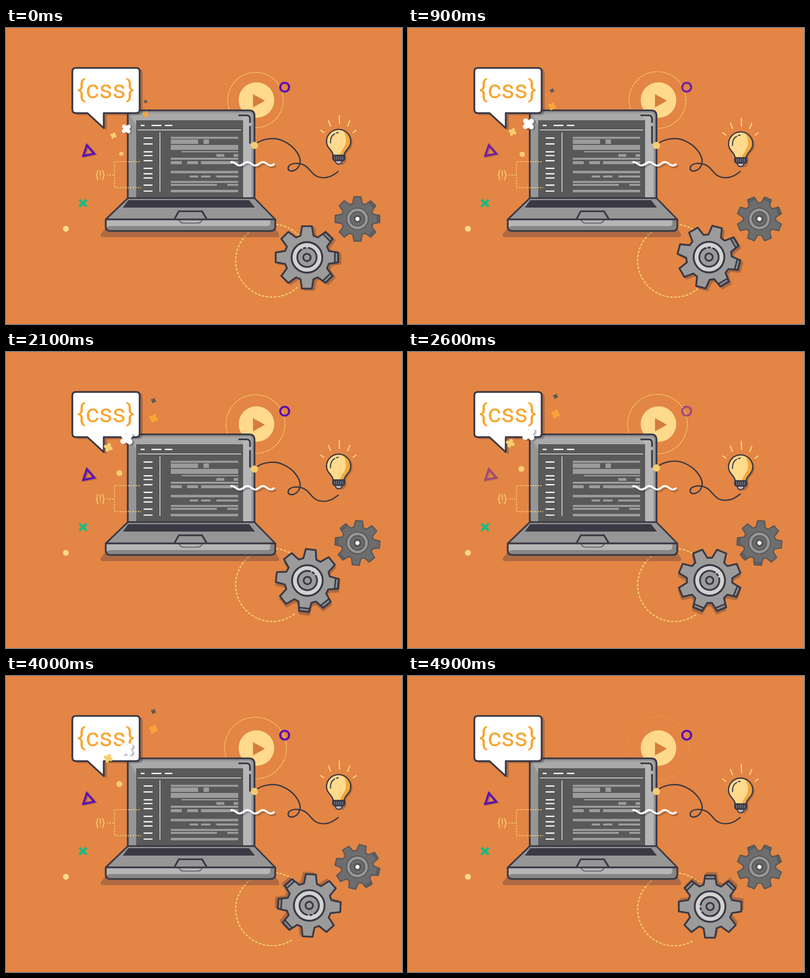
Recreate the animation shown at these times as an HTML page. Size 800 by 600 pixels, loop 5000 ms.

```html
<!DOCTYPE html>
<html lang="en">
<head>
<meta charset="utf-8">
<title>Coding workspace</title>
<style>
  html, body { margin: 0; width: 100%; height: 100%; overflow: hidden; background: #e38544; }
  svg { display: block; width: 100vw; height: 100vh; }
  text { font-family: Roboto, Arial, sans-serif; text-anchor: middle; }
</style>
</head>
<body>
<svg id="stage" viewBox="0 0 800 600"></svg>
<script>
const INK = '#3a3944', SHADE = 'rgb(55,45,60)', CREAM = '#ffd98c', GOLD = '#f6cc70';
const PURPLE = '#5b0fb3', GREY = '#969696', LIGHT = '#b6b6b6';
const LOOP = 5000;

const path = (d, attrs) => `<path d="${d}" ${attrs}/>`;
const line = (d, color, width, extra = '') =>
  path(d, `fill="none" stroke="${color}" stroke-width="${width}" ${extra}`);
const rect = (x, y, x2, y2, fill) =>
  `<rect x="${x}" y="${y}" width="${x2 - x}" height="${y2 - y}" fill="${fill}"/>`;
const circle = (x, y, r, fill, extra = '') =>
  `<circle cx="${x}" cy="${y}" r="${r}" fill="${fill}" ${extra}/>`;
const group = (id, body, extra = '') => `<g id="${id}" ${extra}>${body}</g>`;
const ROUND = 'stroke-linecap="round" stroke-linejoin="round"';
const outline = (w, color = INK) => `stroke="${color}" stroke-width="${w}" stroke-linejoin="round"`;

function laptop() {
  const dashes = [223, 235, 251, 258.7, 269, 284.5, 295.5, 304, 318.5, 330.7]
    .map(y => `M278 ${y}h18`).join('');
  // Each row: top, bottom, then pairs of left and right edges.
  const rows = [
    [220.5, 224.5, 333, 469], [226, 235, 333, 388, 399, 410], [237, 247, 333, 469],
    [249.5, 252, 355, 469], [255.5, 261, 425, 441, 460, 469], [263, 267, 333, 469],
    [270, 276, 333, 355, 366, 388, 394, 469], [289.5, 294.5, 333, 469],
    [299, 303, 371, 388, 394, 413, 425, 469], [310, 314, 333, 469],
    [316, 320, 333, 426, 447, 469], [328, 333, 333, 469]
  ];
  let code = '';
  for (const [top, bottom, ...xs] of rows)
    for (let i = 0; i < xs.length; i += 2) code += rect(xs[i], top, xs[i + 1], bottom, '#9c9c9c');

  const lid = 'M246 345V175q0-8 8-8H491q11 0 11 11V345Z';
  const front = 'M201.5 388H544V402q0 9.500-9.500 9.500H211q-9.500 0-9.500-9.500Z';
  return path('M201 406L192 417Q189 424 197 424H547Q554 424 551 417L544 406Z', `fill="${SHADE}" opacity=".3"`) +
    path(lid, `fill="${GREY}"`) +
    path('M250 173H488q8 0 8 8V345H479V187H263Z', `fill="${LIGHT}"`) +
    path('M265 173H470L479 187H263L251 175Z', 'fill="#a9a9a9"') +
    path('M250 175L263 187V198Z', 'fill="#a9a9a9"') +
    rect(263, 187, 479, 345, '#595959') +
    line('M272 197.500h8M294 197.500h20M321 197.500h15', '#fff', 2.4) +
    line('M266 206.700H475M311 211.500V332', '#fff', 1.3) +
    line(dashes, '#fff', 2.3) + code +
    path(lid, `fill="none" ${outline(3.6)}`) +
    line('M471 177H486q7 0 7 7V191M493 200V233', INK, 3.6, ROUND) +
    path('M246 345H502L544 388H201.500Z', `fill="${GREY}" ${outline(3.2)}`) +
    path('M247 349H491L503 364H236Z', `fill="${INK}"`) +
    path('M340 388L349 371.500H396L406 388', `fill="${GREY}" ${outline(3.6)}`) +
    path(front, 'fill="#868686"') +
    path('M203 389H534V395q0 6.500-6.500 6.500H212q-9 0-9 6Z', `fill="${LIGHT}"`) +
    path('M349 388.500q3.500 7 10 7H387q6.500 0 10-7Z', `fill="${LIGHT}" ${outline(2.2, '#66666a')}`) +
    path(front, `fill="none" ${outline(3.6)}`);
}

function bubble() {
  const d = 'M141 81H263q7 0 7 7V165.500q0 7-7 7H197.500V203L164.500 172.500H141q-7 0-7-7V88q0-7 7-7Z';
  return path(d, `fill="${SHADE}" opacity=".3" transform="translate(5 3)" ${outline(2, SHADE)}`) +
    path(d, `fill="#fff" ${outline(3.6)}`) +
    '<text x="201.500" y="142" font-size="52" fill="#f7a531">{css}</text>';
}

function bulb() {
  const glass = 'M661 258C660 247 647.500 244 647.500 230A24.500 24.500 0 0 1 696.500 230C696.500 244 684 247 683 258Z';
  return line('M673.300 177L673.800 195M651 187L656 199.500M635 207L643 212.500M695 187L690 199.500M708 207L700.500 212.500', CREAM, 2.2) +
    path(glass + 'M660 258H684V268L678 275H666L660 268Z', `fill="${SHADE}" opacity=".3" transform="translate(3.500 2)"`) +
    path(glass, `fill="${CREAM}"`) +
    path('M680 207.500C701 215 702 238 689 245Q684 250 683 258H675C676 247 687 241 687 228Q687 215 680 207.500Z', 'fill="#f3a73f"') +
    path(glass, `fill="none" ${outline(2.6)}`) +
    line('M655.500 233Q655 219 664 214.500M667.500 212.800L671 212', INK, 2.2, ROUND) +
    path('M664 268H680L677 274q-5 4-10 0Z', `fill="#b9b8c4" ${outline(2.2)}`) +
    path('M660 258H684.500V266l-3 3H663l-3-3Z', `fill="${INK}" ${outline(2)}`) +
    line('M664 260v7M668 260v7M672 260v7M676 260v7M680 260v7', '#97979d', 1.2);
}

function gearShape(R, r) {
  const pts = [];
  for (let i = 0; i < 8; i++)
    for (const [rad, off] of [[r, -16.5], [R, -9], [R, 9], [r, 16.5]]) {
      const a = (i * 45 + off) * Math.PI / 180;
      pts.push((rad * Math.cos(a)).toFixed(1) + ' ' + (rad * Math.sin(a)).toFixed(1));
    }
  return 'M' + pts.join('L') + 'Z';
}

// Three neighbouring teeth carry a darker edge strip.
const toothEdges = (R, fill, ink, w) => [-45, 0, 45].map(a =>
  path(`M${R * .88} ${-R * .165}L${R * .98} ${-R * .15}V${R * .15}L${R * .88} ${R * .165}Z`,
    `fill="${fill}" ${outline(w, ink)} transform="rotate(${a})"`)).join('');

function bigGear() {
  const d = gearShape(64, 46);
  return path(d, `fill="${SHADE}" opacity=".3" transform="translate(5 3)" ${outline(3, SHADE)}`) +
    path(d, `fill="#9b9b9b" ${outline(3.6)}`) + toothEdges(64, '#8a8a8a', INK, 3) +
    circle(0, 0, 31, '#d2d2d2', outline(3.8)) + circle(0, 0, 19.5, '#9b9b9b') +
    circle(0, 0, 19.5, 'none', outline(3.6) + ' pathLength="360" stroke-dasharray="235 16 10 19 80 0" stroke-linecap="round"') +
    circle(0, 0, 7.5, '#9b9b9b', outline(3.6));
}

function smallGear() {
  const ink = '#58585b';
  return path(gearShape(45.5, 33), `fill="#6d6d6d" ${outline(2.6, ink)}`) +
    toothEdges(45.5, '#626262', ink, 2) +
    circle(0, 0, 22, '#979797', outline(2.2, ink)) + circle(0, 0, 14.5, '#6d6d6d', outline(2.4, ink)) +
    circle(0, 0, 8.5, ink) + circle(0, 0, 4, '#fff');
}

function wave() {
  let d = '';
  for (let x = 455; x <= 541; x += 2)
    d += (d ? 'L' : 'M') + x + ' ' + (275.2 - 3.5 * Math.cos((x - 456) * 2 * Math.PI / 31.5)).toFixed(2);
  return line(d, SHADE, 4, ROUND + ' opacity=".3" transform="translate(3 4)"') + line(d, '#fff', 4, ROUND);
}

const CROSS = 'M-9 0H9M0-9V9';
const cross = (color, tilt, size) =>
  line(CROSS, color, 11.5, `stroke-linecap="round" transform="rotate(${tilt}) scale(${size})"`);

// Start point, end of the burst, artwork.
const bits = [
  { from: [217, 218], to: [206.5, 205], art: cross('#f8cd6f', 22, .62) },
  { from: [233, 255], to: [229, 257], art: circle(0, 0, 6, '#f8cd6f') },
  { from: [243, 204.5], to: [243.5, 186.5], art:
    `<g transform="translate(4 2)" opacity=".3">${cross(SHADE, 48, 1)}</g>` + cross('#fff', 48, 1) },
  { from: [282, 175], to: [298, 146], art: cross('#f7a53a', 20, .62) },
  { from: [282, 149], to: [298, 110], art: cross('#5c5a5c', 20, .36) }
];

const wire = 'M502 238C512 226 540 219 560 229C585 240 596 262 594 273C591 291 571 294 570 285' +
  'C569 273 594 270 608 282C619 292 622 303 641 303.500C655 304 664 296 671 291';
const triangle = 'M163.300 237.500L178 254.700L156 259.300Z';

document.getElementById('stage').innerHTML =
  circle(504, 146, 1, 'none', `id="halo" stroke="${GOLD}" stroke-width="1.9" stroke-dasharray="1.600 3.500" stroke-linecap="round"`) +
  circle(506, 146, 36, CREAM) + path('M499 134L523 147.500L499 161Z', 'fill="#d67d3b"') +
  group('arc', line('M50 54A74 74 0 1 1 53 -52', GOLD, 2.7, 'stroke-dasharray="2.800 5.200" stroke-linecap="round"')) +
  laptop() + bubble() +
  line('M204 298H219M270 271H219V323.500H273', GOLD, 2, 'stroke-dasharray="2.600 2.600"') +
  `<text x="190.500" y="304.500" font-size="22" fill="${GOLD}">{!}</text>` +
  circle(121, 407, 6, CREAM) +
  line('M148 348L163 362M163 348L148 362', '#0fbd87', 4.6) +
  group('blink',
    line(triangle, SHADE, 4.2, 'opacity=".3" transform="translate(3 1.500)"') + line(triangle, PURPLE, 4.2) +
    circle(563, 120, 9, 'none', `stroke="${PURPLE}" stroke-width="4.200"`)) +
  group('wire', line(wire, INK, 2.7, ROUND) + circle(502, 238, 7.3, GOLD)) +
  wave() + group('bulb', bulb()) +
  group('small', smallGear()) + group('big', bigGear()) +
  group('bits', bits.map((b, i) => group('bit' + i, b.art)).join(''));

const el = id => document.getElementById(id);
const move = (id, value) => el(id).setAttribute('transform', value);
const clamp = x => Math.min(1, Math.max(0, x));
const smooth = x => (1 - Math.cos(Math.PI * x)) / 2;

function track(keys, t, ease = x => x) {
  let i = 1;
  while (i < keys.length - 1 && t > keys[i][0]) i++;
  const [t0, a] = keys[i - 1], [t1, b] = keys[i];
  return a + (b - a) * ease(clamp((t - t0) / (t1 - t0)));
}

const bigTurn = [[0, 0], [.9, 15], [1.6, 35], [2.6, 67.5], [3.3, 119], [4, 183], [4.9, 270], [5, 280]];
const bob = [[0, 0], [.8, 5.2], [1.7, -.3], [2.5, 3.2], [3.8, -6.2], [5, 1.5]];
const rise = [[1.6, 0], [2.1, 11.5], [2.6, 20], [5, 51]];

function draw(t) {
  el('halo').setAttribute('r', 56 + 1.63 * t);
  el('halo').setAttribute('opacity', clamp((5 - t) / .5));
  move('arc', `translate(538 ${472 + .3 * t}) rotate(${2.85 * t})`);

  // Three short dips in opacity per loop.
  const dip = ((t - .824 + 1.626) % 1.626) / .6;
  el('blink').setAttribute('opacity', t > .824 && dip < 1 ? 1 - Math.sin(Math.PI * dip) ** 2 : 1);

  move('wire', `translate(0 ${track([[1.7, 0], [3.1, -4]], t, smooth)})`);
  move('bulb', `translate(0 ${track(bob, t, smooth)})`);

  const turn = t < .3 ? 150 * t * t : 90 * (t - .15);
  move('small', `translate(710 387) rotate(${-turn})`);
  move('big', `translate(610.3 465) rotate(${track(bigTurn, t)}) translate(-2.300 0)`);

  const burst = clamp(t / 1.6), lift = track(rise, t);
  const size = .72 + .28 * burst * (1.3 - .3 * burst);
  bits.forEach(({ from, to }, i) => {
    const x = from[0] + (to[0] - from[0]) * burst;
    const y = from[1] + (to[1] - from[1]) * burst - lift;
    move('bit' + i, `translate(${x} ${y}) scale(${size})`);
  });
  el('bits').setAttribute('opacity', clamp((4.9 - t) / .4));
}

function tick() {
  draw(performance.now() % LOOP / 1000);
  requestAnimationFrame(tick);
}
tick();
</script>
</body>
</html>
```
